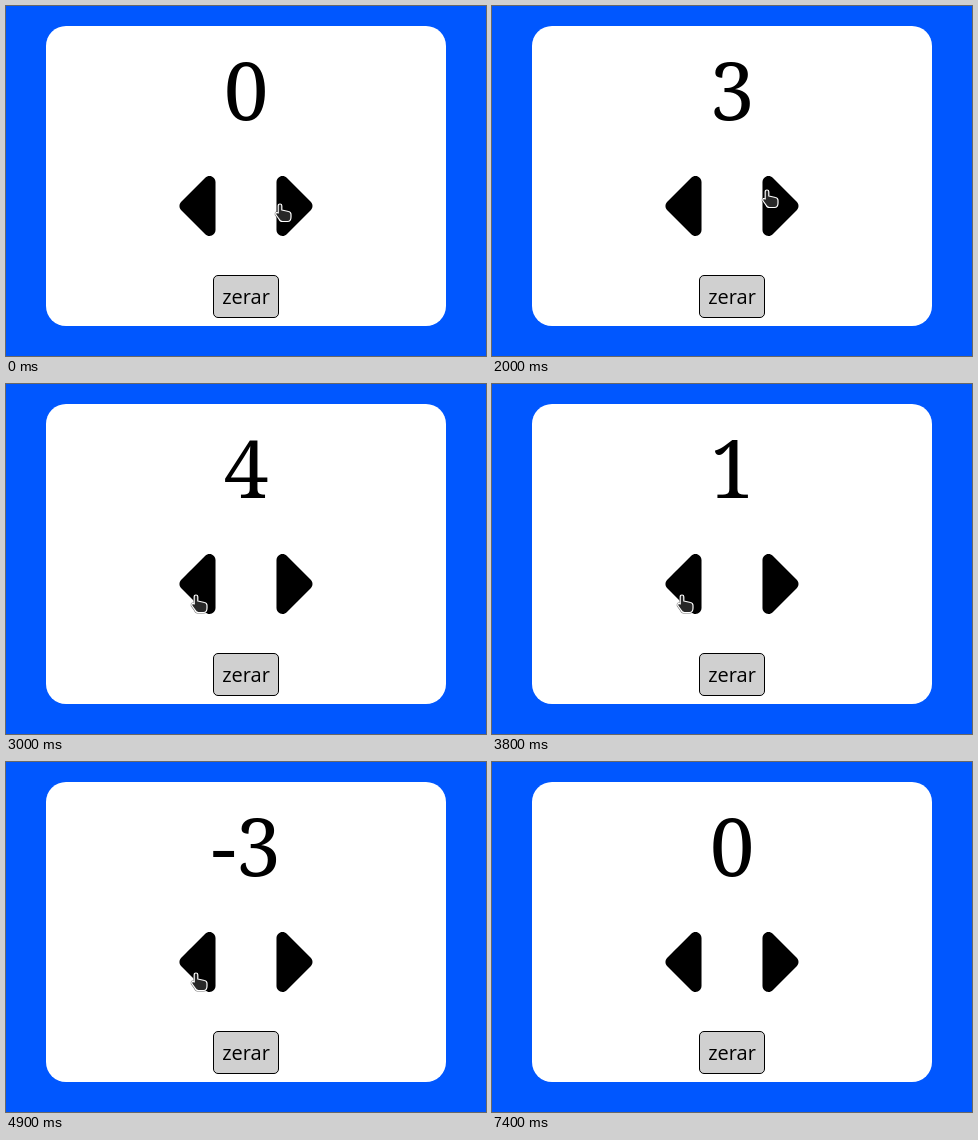
Write an HTML page that moves like this. It is 480 px wide and 350 px high and loops after 8600 ms.

```html
<!DOCTYPE html>
<html lang="pt">
<head>
<meta charset="utf-8">
<title>Contador</title>
<style>
  html, body { margin: 0; width: 100%; height: 100%; overflow: hidden; background: #0057ff; }
  svg { display: block; width: 480px; height: 350px; }
  text { text-anchor: middle; }
  #count { font: 80px "Noto Serif", serif; }
  #label { font: 20px "Open Sans", "Noto Sans", sans-serif; }
  .edge { fill: none; stroke: #0008; stroke-width: 2.2; }
  .skin { fill: #282828; stroke: #fff; stroke-width: 1.2; stroke-linejoin: round; }
</style>
</head>
<body>
<svg viewBox="0 0 480 350">
  <defs>
    <path id="caret" transform="translate(173.5 152) scale(.1875)" d="M9.4 278.6c-12.5-12.5-12.5-32.8 0-45.3l128-128c9.2-9.2 22.9-11.9 34.9-6.9s19.8 16.6 19.8 29.6v256c0 12.9-7.8 24.6-19.8 29.6s-25.7 2.2-34.9-6.9z"/>
    <path id="handShape" d="M-1.8 1.8Q-1.8 0 0 0Q1.8 0 1.8 1.8V6L8.5 7.5Q11 8 11 10.5V13Q11 17.5 7.5 17.5H2.5Q0 17.5-1 15L-4.2 10.5Q-4.5 7.5-1.8 9Z"/>
    <path id="arrowShape" d="M0 0V15L3.6 11.8L6 17L8.4 16L6 10.9H11Z"/>
  </defs>
  <rect width="480" height="350" fill="#0057ff"/>
  <rect x="40" y="20" width="400" height="300" rx="20" fill="#fff"/>
  <text id="count" x="240" y="114">0</text>
  <use href="#caret"/>
  <use href="#caret" transform="translate(480) scale(-1 1)"/>
  <rect x="207.5" y="269.5" width="65" height="42" rx="4.5" fill="#d0d0d0" stroke="#000"/>
  <text id="label" x="240" y="298">zerar</text>
  <g id="cursor">
    <g id="hand"><use href="#handShape" class="edge"/><use href="#handShape" class="skin"/></g>
    <g id="arrow"><use href="#arrowShape" class="edge"/><use href="#arrowShape" class="skin"/></g>
  </g>
</svg>
<script>
  const LOOP = 8600, STEP = 100;
  const RESET = 6100, LEAVE = 7400;

  const ups = [500, 1800, 2000, 2200];
  const downs = [3400, 3600, 3800, 4000, 4400, 4700, 4900];

  // Each glide bends from the previous stop through "via" to "to".
  const home = [274, 198];
  const glides = [
    { start: 500, end: 500, via: [280, 199], to: [285, 200] },
    { start: 900, end: 1400, via: [345, 225], to: [275, 184] },
    { start: 2400, end: 3000, via: [240, 310], to: [190, 211] },
    { start: 5400, end: 5600, via: [200, 255], to: [224, 288] },
    { start: 7000, end: 7100, via: [340, 290], to: [438, 254] },
    { start: 7300, end: 7300, via: [442, 245], to: [447, 235] }
  ];

  const $ = id => document.getElementById(id);
  const show = (el, on) => el.setAttribute("visibility", on ? "visible" : "hidden");
  const clicks = (times, t) => times.filter(c => c <= t).length;
  const bend = (a, b, c, p) => (1 - p) ** 2 * a + 2 * p * (1 - p) * b + p * p * c;

  const value = t => t >= RESET ? 0 : clicks(ups, t) - clicks(downs, t);

  function pointer(t) {
    let pos = home;
    for (const { start, end, via, to } of glides) {
      if (t < start) break;
      const taken = Math.floor((t - start) / STEP) + 1;
      const p = Math.min(1, taken / ((end - start) / STEP + 1));
      pos = pos.map((from, i) => bend(from, via[i], to[i], p));
    }
    return pos;
  }

  // The carets mirror each other, so both are tested by distance from the centre line.
  function overButton(x, y) {
    const side = Math.abs(x - 240);
    const onCaret = side >= 30 && side <= 66 && Math.abs(y - 200) <= 30;
    const onLabel = side <= 33 && y >= 269 && y <= 312;
    return onCaret || onLabel;
  }

  function draw(t) {
    const [x, y] = pointer(t);
    const visible = t < LEAVE;
    const over = overButton(x, y);
    $("count").textContent = value(t);
    $("cursor").setAttribute("transform", `translate(${x} ${y})`);
    show($("hand"), visible && over);
    show($("arrow"), visible && !over);
  }

  const start = performance.now();
  function tick() {
    draw((performance.now() - start) % LOOP);
    requestAnimationFrame(tick);
  }
  tick();
</script>
</body>
</html>
```
